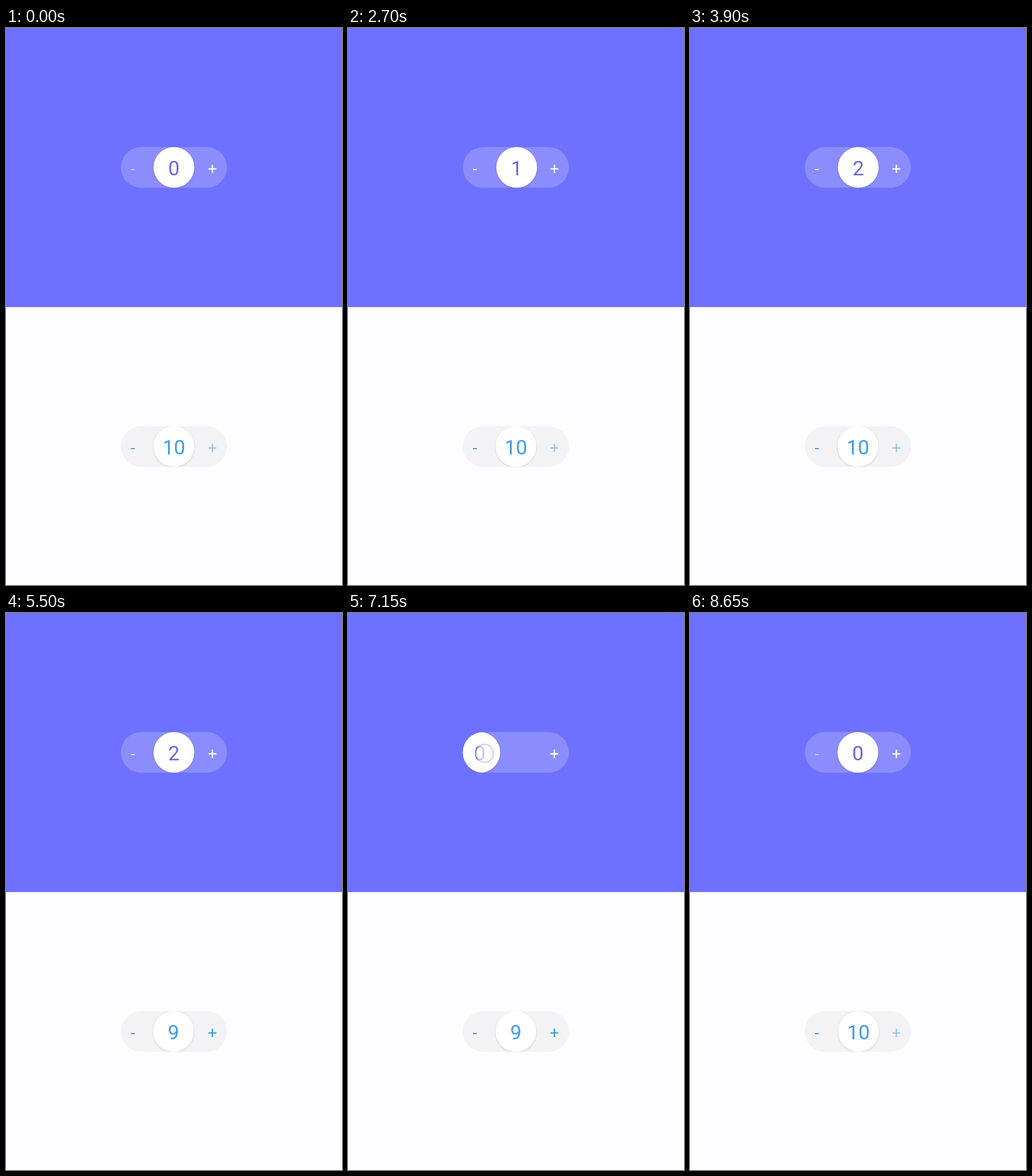
These frames come from a looping animation (581x964 px, 8.7 s). An HTML page:

```html
<!DOCTYPE html>
<html lang="en">
<head>
<meta charset="utf-8">
<title>Swipe steppers</title>
<style>
  html, body { margin: 0; width: 100%; height: 100%; overflow: hidden; background: #fdfcff; }
  svg { display: block; width: 581px; height: 964px; }
  text { font-family: Roboto, "Noto Sans", sans-serif; text-anchor: middle; }
  .sign { font-size: 28px; }
  .value { font-size: 35px; }
  .disc { fill: #fff; filter: drop-shadow(0 1px 1.5px rgba(0, 0, 0, .17)); }
  .light .pill { fill: #fff; fill-opacity: .2; }
  .light .sign { fill: #fff; }
  .light .value { fill: #6a69dc; }
  .blue .pill { fill: #f3f3f5; }
  .blue text { fill: #3f9cef; }
  #touch { fill: #fff; fill-opacity: .62; stroke: #6f70cc; stroke-opacity: .3; stroke-width: 2.5; }
</style>
</head>
<body>
<svg viewBox="0 0 581 964">
  <defs>
    <clipPath id="pillClip"><rect x="198.5" y="206" width="183.5" height="70.5" rx="35.25"/></clipPath>
  </defs>
  <rect width="581" height="483" fill="#6e70ff"/>
  <g id="top" class="light"></g>
  <g id="bottom" class="blue" transform="translate(0 483)"></g>
  <circle id="touch" r="15.5"/>
</svg>
<script>
const LOOP = 8700, STEP = 50;
const CENTER = 290.3, FOLLOW = 0.77;

// start, finger at rest, release (ms); finger path from -> to
const drags = {
  top: [
    { start: 2050, rest: 2250, end: 2300, from: [293, 238], to: [391, 218], value: 1 },
    { start: 3050, rest: 3350, end: 3400, from: [298, 240], to: [427, 232], value: 2 },
    { start: 6450, rest: 6630, end: 6680, from: [306, 241], to: [222, 244], value: 1 },
    { start: 6900, rest: 7150, end: 7220, from: [316, 239], to: [236, 243], value: 0 }
  ],
  bottom: [
    { start: 4750, rest: 4980, end: 5030, from: [295, 724], to: [218, 729], value: 9 },
    { start: 8050, rest: 8200, end: 8250, from: [294, 724], to: [371, 727], value: 10 }
  ]
};

const markup = `
  <rect class="pill" x="198.5" y="206" width="183.5" height="70.5" rx="35.25"/>
  <text class="sign minus" x="219.3" y="252.5">-</text>
  <text class="sign plus" x="356.9" y="252.5">+</text>
  <g clip-path="url(#pillClip)">
    <g class="knob">
      <circle class="disc" cy="241.25" r="35.25"/>
      <text class="value" y="254.5"></text>
    </g>
  </g>`;

function makeStepper(id, initial) {
  const root = document.getElementById(id);
  root.innerHTML = markup;
  const find = name => root.querySelector('.' + name);
  return {
    drags: drags[id], initial,
    knob: find('knob'), value: find('value'), minus: find('minus'), plus: find('plus')
  };
}

const steppers = [makeStepper('top', 0), makeStepper('bottom', 10)];
const touch = document.getElementById('touch');

const progress = (d, t) => {
  const p = Math.min(1, Math.max(0, (t - d.start) / (d.rest - d.start)));
  return p * p * (3 - 2 * p);
};

// Underdamped return to rest
function spring(ms) {
  if (ms > 520) return 0;
  const s = ms / 1000, decay = 9.7, freq = 15.15;
  return Math.exp(-decay * s) * (Math.cos(freq * s) + decay / freq * Math.sin(freq * s));
}

function offset(d, t) {
  if (t < d.start) return 0;
  const reach = (d.to[0] - d.from[0]) * FOLLOW;
  return reach * (t < d.end ? progress(d, t) : spring(t - d.end));
}

function draw(t) {
  let finger = null;
  for (const s of steppers) {
    let x = CENTER, value = s.initial;
    for (const d of s.drags) {
      const p = progress(d, t);
      x += offset(d, t);
      if (p > 0.8) value = d.value;
      if (t >= d.start && t < d.end) finger = d.from.map((a, i) => a + (d.to[i] - a) * p);
    }
    s.knob.setAttribute('transform', `translate(${x.toFixed(2)} 0)`);
    s.value.textContent = value;
    s.minus.setAttribute('opacity', value === 0 ? 0.5 : 1);
    s.plus.setAttribute('opacity', value === 10 ? 0.5 : 1);
  }
  touch.setAttribute('visibility', finger ? 'visible' : 'hidden');
  if (finger) {
    touch.setAttribute('cx', finger[0]);
    touch.setAttribute('cy', finger[1]);
  }
}

const begin = performance.now();
function tick() {
  const t = (performance.now() - begin) % LOOP;
  draw(Math.floor(t / STEP) * STEP);
  requestAnimationFrame(tick);
}
tick();
</script>
</body>
</html>
```
